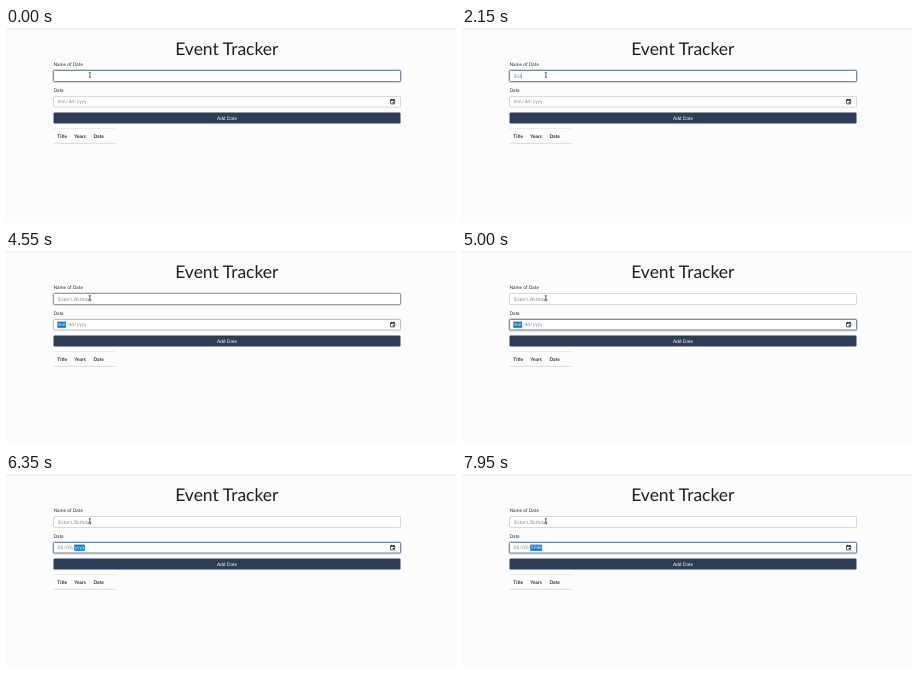
Write an HTML page that moves like this. It is 450 px wide and 195 px high and loops after 8000 ms.

```html
<!DOCTYPE html>
<html lang="en">
<head>
<meta charset="utf-8">
<title>Event Tracker</title>
<style>
  html, body { margin: 0; width: 100%; height: 100%; overflow: hidden; background: #fcfcfc; }
  svg { display: block; width: 450px; height: 195px; }
  text { font: 4.85px Lato, sans-serif; fill: #2b2f33; text-rendering: geometricPrecision; white-space: pre; }
  .title { font-size: 17.5px; fill: #1c1f22; }
  .head { font-weight: 700; }
  .btn { fill: #fff; }
  .value { fill: #808a93; }
  .field { fill: #fff; stroke: #d6d9dc; }
  .focus rect { fill: none; stroke: #7b8b9f; }
  .focus .ring { stroke: #2c3e50; stroke-opacity: .2; }
</style>
</head>
<body>
<svg viewBox="0 0 450 195">
  <rect width="450" height="195" fill="#fcfcfc"/>
  <rect width="450" height="2" fill="#f1f1f1"/>
  <text class="title" x="220.8" y="26.6" text-anchor="middle">Event Tracker</text>

  <text x="47.4" y="38.2">Name of Date</text>
  <rect class="field" x="47.5" y="42.5" width="347" height="11" rx="1"/>
  <g class="focus" id="nameFocus">
    <rect class="ring" x="46.5" y="41.5" width="349" height="13" rx="2"/>
    <rect x="47.5" y="42.5" width="347" height="11" rx="1"/>
  </g>
  <text class="value" id="name" x="51.7" y="49.5"></text>
  <rect id="caret" y="45.2" width=".5" height="5.4" fill="#2c3e50"/>

  <text x="47.4" y="64">Date</text>
  <rect class="field" x="47.5" y="68.5" width="347" height="10.5" rx="1"/>
  <g class="focus" id="dateFocus">
    <rect class="ring" x="46.5" y="67.5" width="349" height="12.5" rx="2"/>
    <rect x="47.5" y="68.5" width="347" height="10.5" rx="1"/>
  </g>
  <rect id="selection" y="70.6" height="6.2" fill="#0b78d0"/>
  <g id="date"></g>
  <g fill="none" stroke="#16191c">
    <rect x="384.5" y="71.7" width="4.2" height="4.2" rx=".3" stroke-width=".7"/>
    <path d="M384.3 72.3h4.6M385.4 70.9v1M387.8 70.9v1" stroke-width=".9"/>
    <path d="M386.8 74.6h1.3" stroke-width="1.2"/>
  </g>

  <rect x="47.5" y="84.5" width="347" height="11" rx="1.2" fill="#2c3e56"/>
  <text class="btn" x="221" y="91.7" text-anchor="middle">Add Date</text>

  <path d="M47.5 100.5h61.5" stroke="#ebecee"/>
  <path d="M47.5 115.3h62" stroke="#d3d6d9" stroke-width=".9"/>
  <text class="head" x="51.3" y="109.7">Title</text>
  <text class="head" x="68.3" y="109.7">Years</text>
  <text class="head" x="87.4" y="109.7">Date</text>

  <path d="M82.7 44.5q1.1 0 1.1.7 0-.7 1.1-.7M83.8 45v4M82.7 49.5q1.1 0 1.1-.7 0 .7 1.1.7"
        fill="none" stroke="#24282c" stroke-width=".65"/>
</svg>
<script>
const LOOP = 8000, BLUR = 4500, FADE = 150;
const NAME = "Sister's Birthday";
const KEYS = [550, 1300, 1750, 2050, 2350, 2600, 2800, 2950, 3050, 3200,
              3350, 3450, 3550, 3700, 3800, 3950, 4050];

// time, month, day, year, selected part
const DATES = [
  [0, "mm", "dd", "yyyy", -1],
  [BLUR, "mm", "dd", "yyyy", 0],
  [5500, "08", "dd", "yyyy", 1],
  [6250, "08", "08", "yyyy", 2],
  [7100, "08", "08", "0001", 2],
  [7350, "08", "08", "0019", 2],
  [7600, "08", "08", "0198", 2],
  [7900, "08", "08", "1988", 2]
];

const el = id => document.getElementById(id);
const set = (node, attrs) => {
  for (const key in attrs) node.setAttribute(key, attrs[key]);
};

const glyphs = Array.from({ length: 5 }, () => {
  const node = document.createElementNS("http://www.w3.org/2000/svg", "text");
  set(node, { class: "value", y: 75.4 });
  return el("date").appendChild(node);
});

function drawName(t) {
  const typed = KEYS.filter(k => k <= t);
  const name = el("name");
  name.textContent = NAME.slice(0, typed.length);
  const width = typed.length ? name.getComputedTextLength() : 0;
  // Each key press restarts the blink
  const since = t - (typed.length ? typed[typed.length - 1] : -500);
  const visible = t < BLUR && since % 1000 < 500;
  set(el("caret"), { x: 51.8 + width, opacity: visible ? .75 : 0 });
}

function drawDate(t) {
  const [, month, day, year, picked] = DATES.filter(d => d[0] <= t).pop();
  const pad = .32;
  let x = 51.3;
  set(el("selection"), { width: 0 });
  [month, "/", day, "/", year].forEach((str, i) => {
    const node = glyphs[i], gap = i % 2 ? 0 : pad, on = i === picked * 2;
    node.textContent = str;
    set(node, { x: x + gap });
    node.style.fill = on ? "#fff" : "";
    const width = node.getComputedTextLength() + gap * 2;
    if (on) set(el("selection"), { x, width });
    x += width;
  });
}

function draw(t) {
  const p = Math.min(1, Math.max(0, (t - BLUR) / FADE));
  const eased = p * p * (3 - 2 * p);
  set(el("nameFocus"), { opacity: 1 - eased });
  set(el("dateFocus"), { opacity: eased });
  drawName(t);
  drawDate(t);
}

const start = performance.now();
function tick() {
  draw((performance.now() - start) % LOOP);
  requestAnimationFrame(tick);
}
tick();
</script>
</body>
</html>
```
